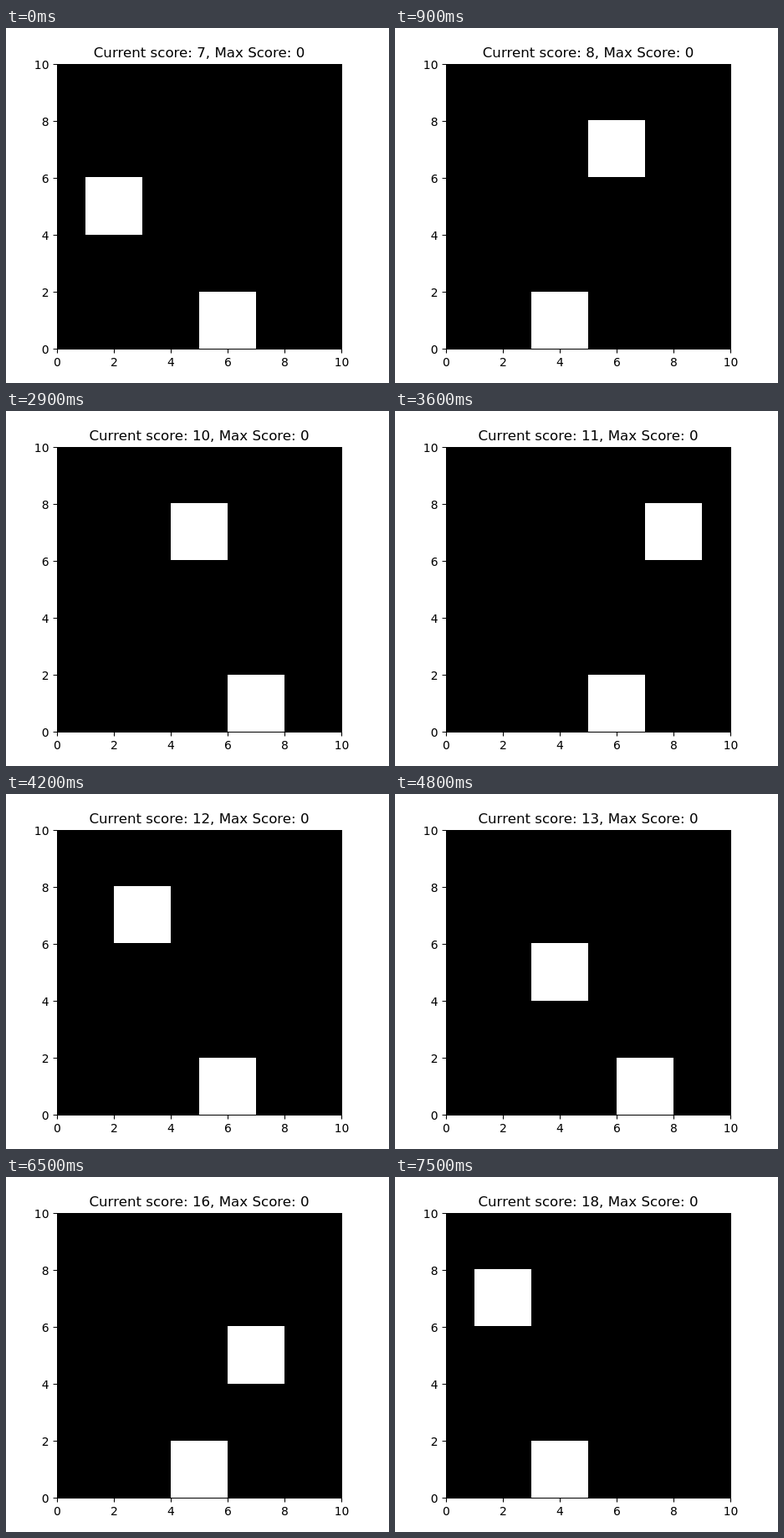
An HTML page for the animation above (7.6 s loop, 458x424 px).

```html
<!DOCTYPE html>
<html lang="en">
<head>
<meta charset="utf-8">
<title>Dodge the block</title>
<style>
  html, body { margin: 0; width: 100%; height: 100%; overflow: hidden; background: #fff; }
  svg { display: block; width: 458px; height: 424px; }
  text { font-family: "DejaVu Sans", Verdana, sans-serif; font-size: 13.89px; text-anchor: middle; }
  #title { font-size: 16.67px; }
  .side { text-anchor: end; }
  .tick { stroke: #000; stroke-width: 1.1; }
  .box { fill: #fff; }
  rect { shape-rendering: crispEdges; }
</style>
</head>
<body>
<svg viewBox="0 0 458 424">
  <rect x="61" y="43" width="341" height="341"/>
  <rect id="block" class="box"/>
  <rect id="player" class="box"/>
  <g id="axes"></g>
  <text id="title" x="231" y="35"></text>
</svg>
<script>
  const LOOP = 7600, STEP = 100, SIZE = 2, TOP = 8;
  const px = u => Math.round(60.9 + 34.05 * u);
  const py = u => Math.max(43, Math.round(383 - 34.1 * u));
  const $ = id => document.getElementById(id);

  // Each block drops two units at each of its times, starting from the top.
  const blocks = [
    { score: 7, col: 1, times: [-400, -200, 0, 200, 400] },
    { score: 8, col: 5, times: [600, 900, 1100, 1300, 1500] },
    { score: 9, col: 7, times: [1700, 1900, 2100, 2300, 2500] },
    { score: 10, col: 4, times: [2700, 2900, 3000, 3200, 3300] },
    { score: 11, col: 7, times: [3400, 3600, 3700, 3800] },
    { score: 12, col: 2, times: [4100, 4200, 4300, 4400] },
    { score: 13, col: 3, times: [4600, 4700, 4800, 4900, 5000] },
    { score: 14, col: 7, times: [5100, 5200, 5400, 5500, 5700] },
    { score: 15, col: 2, times: [5800, 5900, 6000, 6100, 6200] },
    { score: 16, col: 6, times: [6300, 6400, 6500, 6600, 6700] },
    { score: 17, col: 5, times: [6900, 7000, 7100, 7200, 7300] },
    { score: 18, col: 1, times: [7400, 7500] }
  ];

  // [time, column]
  const moves = [
    [0, 5], [500, 4], [800, 3], [1800, 4], [2000, 5], [2900, 6],
    [3600, 5], [4300, 6], [5400, 5], [6300, 4], [7100, 3]
  ];

  function drawAxes() {
    let out = "";
    for (let u = 0; u <= 10; u += 2) {
      const x = 61.5 + 34 * u, y = 383.5 - 34 * u;
      out += `<path class="tick" d="M${x} 383.5v4.9M61.5 ${y}h-4.9"/>
        <text x="${x}" y="404">${u}</text>
        <text class="side" x="51.5" y="${y + 5}">${u}</text>`;
    }
    $("axes").innerHTML = out;
  }

  function place(el, col, row) {
    const x = px(col), y = py(row + SIZE);
    el.setAttribute("x", x);
    el.setAttribute("y", y);
    el.setAttribute("width", px(col + SIZE) - x);
    el.setAttribute("height", py(row) - y);
  }

  function render(t) {
    const block = blocks.findLast(b => b.times[0] <= t);
    const drops = block.times.filter(s => s <= t).length - 1;
    place($("block"), block.col, TOP - 2 * drops);
    place($("player"), moves.findLast(m => m[0] <= t)[1], 0);
    $("title").textContent = `Current score: ${block.score}, Max Score: 0`;
  }

  const start = performance.now();
  function tick() {
    const t = (performance.now() - start) % LOOP;
    render(Math.floor(t / STEP) * STEP);
    requestAnimationFrame(tick);
  }

  drawAxes();
  tick();
</script>
</body>
</html>
```
